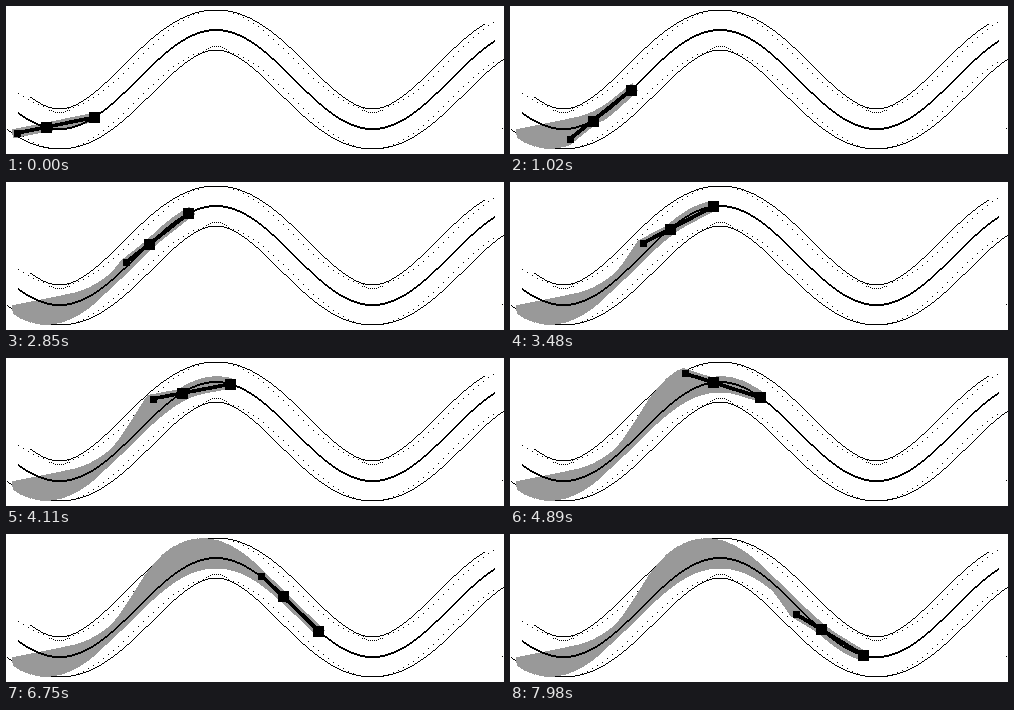
Recreate the animation shown at these times as a matplotlib script. Size 498 px wide and 148 px high, loop 8000 ms.

```python
import numpy as np
import matplotlib.pyplot as plt
from matplotlib.animation import FuncAnimation
from matplotlib.patches import PathPatch
from matplotlib.path import Path

W, H, DPI = 498, 148, 64
PX = 72 / DPI              # points per pixel
LOOP, TICK = 8000, 10      # ms
STEPS = 266
WHEELBASE, OVERHANG = 49.6, 29.7
HALF_WIDTH, CAP = 4, 4
PEAK_X, HALF_WAVE, MID_Y, AMP = 210, 156.5, 73.5, 49.5
X0, X1, ROAD = 12, 489, 20


def wave(x):
    return MID_Y - AMP * np.cos((x - PEAK_X) * np.pi / HALF_WAVE)


def slope(x):
    k = np.pi / HALF_WAVE
    return AMP * k * np.sin((x - PEAK_X) * k)


def solve_poses():
    """Front axle, rear axle and tail for every step, plus the heading."""
    xf = 88.5 + np.arange(STEPS)
    front = np.column_stack([xf, wave(xf)])
    lo, hi = xf - WHEELBASE, xf.copy()
    for _ in range(30):
        x = (lo + hi) / 2
        far = np.hypot(xf - x, front[:, 1] - wave(x)) > WHEELBASE
        lo, hi = np.where(far, x, lo), np.where(far, hi, x)
    rear = np.column_stack([x, wave(x)])
    heading = (front - rear) / WHEELBASE
    return front, rear, rear - heading * OVERHANG, heading


front, rear, tail, heading = solve_poses()
side = np.column_stack([-heading[:, 1], heading[:, 0]]) * HALF_WIDTH
nose, back = front + heading * CAP, tail - heading * CAP
bodies = np.stack([back - side, nose - side, nose + side, back + side,
                   back - side], axis=1)
CODES = [Path.MOVETO] + [Path.LINETO] * 3 + [Path.CLOSEPOLY]

fig = plt.figure(figsize=(W / DPI, H / DPI), dpi=DPI, facecolor="white")
ax = fig.add_axes([0, 0, 1, 1])
ax.set_xlim(0, W)
ax.set_ylim(H, 0)
ax.axis("off")


def pixels(x, y, z=1):
    """Single black pixels at the cells that hold the points."""
    ax.plot(np.floor(x) + 0.5, np.floor(y) + 0.5, ",", color="black",
            antialiased=False, zorder=z)


def square(size):
    return ax.plot([], [], "s", color="black", ms=size * PX, mew=0,
                   antialiased=False, zorder=5)[0]


# Road: centre line two pixels thick
cols = np.arange(X0, X1) + 0.5
for shift in (-0.5, 0.5):
    pixels(cols, wave(cols) + shift, 3)

# Parallel edges, and the same wave shifted straight up and down
xs = np.linspace(X0, X1, 600)
norm = np.hypot(1, slope(xs))
for sign in (-1, 1):
    ex = xs - sign * ROAD * slope(xs) / norm
    ey = wave(xs) + sign * ROAD / norm
    edge = np.arange(max(0, np.ceil(ex[0])), min(W, ex[-1])) + 0.5
    pixels(edge, np.interp(edge, ex, ey))
    dots = np.arange(X0 + 0.5, X1, 5)
    pixels(dots, wave(dots) + sign * ROAD)

# Short dotted arcs inside each bend
arc = np.arange(-10, 11, 2)
for bend, sign in ((-1, -1), (0, 1), (1, -1)):
    x = PEAK_X + bend * HALF_WAVE
    pixels(x + arc, wave(x) + sign * (ROAD - 3.5 + 0.025 * arc ** 2))
pixels([496], [122])

sweep = PathPatch(Path(bodies[0], CODES), fc="#999999", lw=0,
                  antialiased=False, zorder=2)
ax.add_patch(sweep)
beam = ax.plot([], [], color="black", lw=2.5 * PX, antialiased=False,
               solid_capstyle="butt", zorder=4)[0]
marks = [(square(11), front), (square(11), rear), (square(7), tail)]


def draw(frame):
    i = min(max(0, frame * TICK // 30 - 1), STEPS - 1)
    sweep.set_path(Path(bodies[:i + 1].reshape(-1, 2), CODES * (i + 1)))
    beam.set_data(*np.array([tail[i], front[i]]).T)
    for mark, track in marks:
        mark.set_data(track[i, :1], track[i, 1:])
    return [sweep, beam] + [mark for mark, _ in marks]


def init():
    return draw(0)


anim = FuncAnimation(fig, draw, frames=LOOP // TICK, init_func=init,
                     interval=TICK, repeat=True, repeat_delay=0, blit=False)
plt.show()
```
